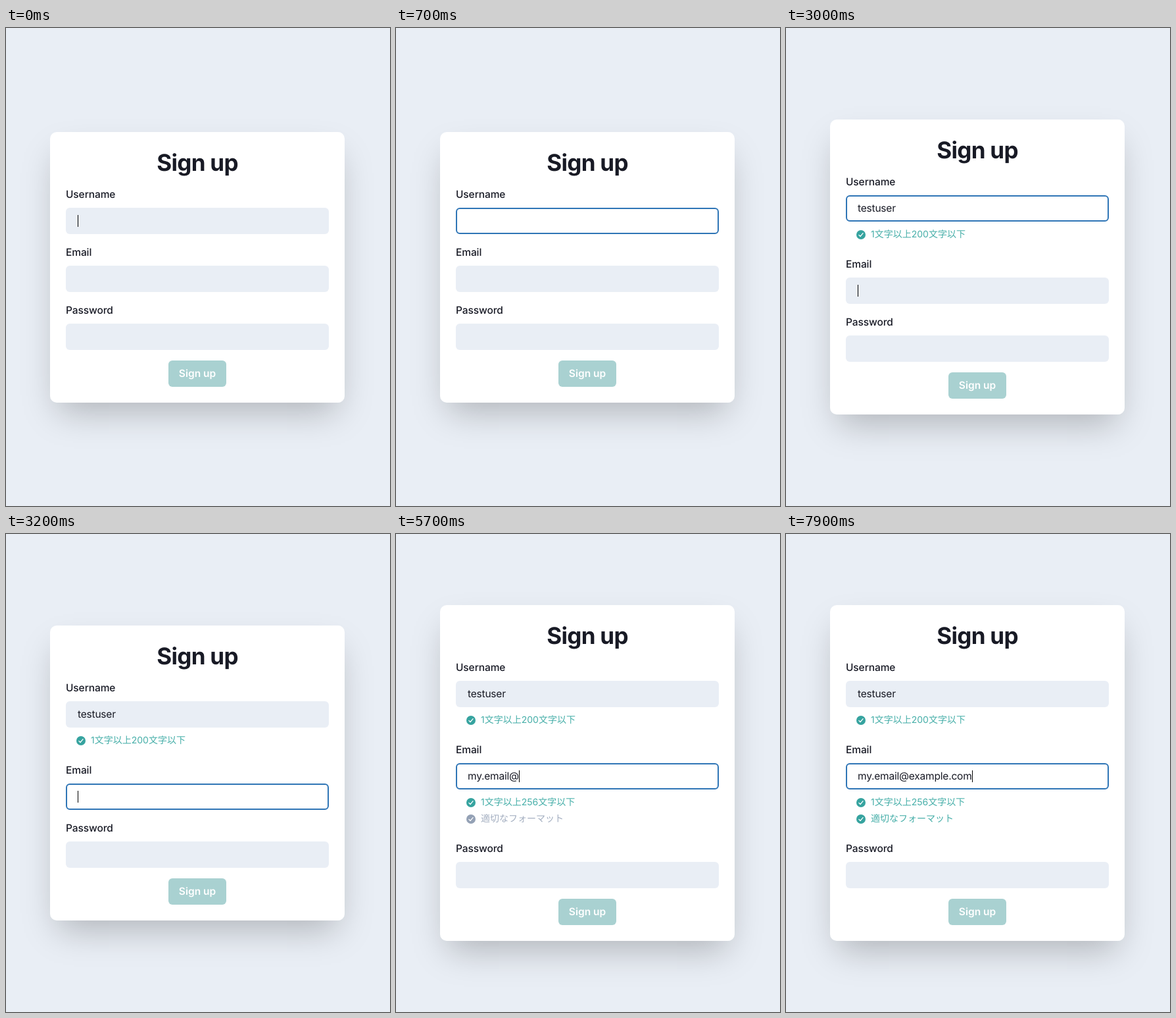
An HTML page that plays this animation: 584 by 726 pixels, repeating every 8 s.

```html
<!DOCTYPE html>
<html lang="en">
<head>
<meta charset="utf-8">
<title>Sign up</title>
<style>
  * { box-sizing: border-box; margin: 0; padding: 0; }
  html, body { width: 100%; height: 100%; overflow: hidden; }
  body {
    position: relative; background: #e9eef5; color: #181a25;
    font: 15.5px/24px Inter, "Noto Sans CJK JP", "Noto Sans CJK", sans-serif;
    text-rendering: geometricPrecision;
  }
  #card {
    position: absolute; left: 67px; width: 448px; padding: 24px;
    background: #fff; border-radius: 10px;
    box-shadow: 0 25px 50px -12px rgba(0, 0, 0, .25);
  }
  h1 {
    height: 59px; font-size: 35px; line-height: 46px; font-weight: 700;
    letter-spacing: -.7px; text-align: center;
  }
  .field { margin-bottom: 16px; }
  label { display: block; margin-bottom: 8px; font-weight: 500; letter-spacing: -.1px; }
  .input {
    position: relative; display: flex; align-items: center; height: 40px;
    padding-left: 16px; border: 2px solid transparent; border-radius: 6px;
    letter-spacing: -.2px; white-space: pre;
  }
  .caret { width: 1px; height: 18px; background: #000; }
  ul { list-style: none; padding: 7px 0 5px 16px; }
  li { display: flex; align-items: center; height: 25px; font-size: 14px; line-height: 25px; color: #a3aec0; }
  li svg { width: 14px; height: 14px; margin: 1px 8px 0 0; fill: #94a1b5; }
  li path { fill: none; stroke: #fff; stroke-width: 1.3; stroke-linecap: round; stroke-linejoin: round; }
  li.ok { color: #45aea8; }
  li.ok svg { fill: #36a39f; }
  #button {
    width: 88px; height: 40px; margin: 0 auto; border-radius: 6px;
    background: #a9d1d1; color: #fff; font-weight: 600; line-height: 40px; text-align: center;
  }
</style>
</head>
<body>
<div id="card">
  <h1>Sign up</h1>
  <div id="fields"></div>
  <div id="button">Sign up</div>
</div>
<script>
const LOOP = 8000, STEP = 100, BLINK = 500, FADE = 200, STAGE_HEIGHT = 726;
const anyText = text => text.length > 0;
const emailFormat = text => /^.+@.+\..+$/.test(text);

// keys: time at which each character of the text appears
const fields = [
  { label: 'Username', text: 'testuser', focus: 0, blur: 3000,
    keys: [800, 900, 1100, 1200, 1800, 1800, 1900, 2100],
    hints: [['1文字以上200文字以下', anyText]] },
  { label: 'Email', text: 'my.email@example.com', focus: 3000, blur: Infinity,
    keys: [3300, 3500, 4300, 4500, 4600, 4700, 4800, 4900, 5700,
           6400, 6500, 6700, 6800, 6900, 7100, 7300, 7500, 7600, 7800, 7900],
    hints: [['1文字以上256文字以下', anyText], ['適切なフォーマット', emailFormat]] },
  { label: 'Password', text: '', focus: Infinity, blur: Infinity, keys: [], hints: [] }
];

const card = document.getElementById('card');
const icon = '<svg viewBox="0 0 14 14"><circle cx="7" cy="7" r="7"/><path d="M3.9 7.4 6 9.5 10.1 4.7"/></svg>';

for (const field of fields) {
  const el = document.createElement('div');
  el.className = 'field';
  el.innerHTML = `<label>${field.label}</label>
    <div class="input"><span></span><i class="caret"></i></div>
    <ul lang="ja">${field.hints.map(([text]) => `<li>${icon}${text}</li>`).join('')}</ul>`;
  document.getElementById('fields').append(el);
  field.input = el.querySelector('.input');
  field.value = el.querySelector('span');
  field.caret = el.querySelector('.caret');
  field.list = el.querySelector('ul');
  field.items = [...el.querySelectorAll('li')];
}

function fade(elapsed) {
  const p = Math.min(Math.max(elapsed / FADE, 0), 1);
  return 1 - (1 - p) ** 2;
}

function drawField(field, t) {
  const typed = field.keys.filter(k => k <= t);
  const text = field.text.slice(0, typed.length);
  field.value.textContent = text;

  const focus = fade(t - field.focus) - fade(t - field.blur);
  field.input.style.backgroundColor = `rgba(233, 238, 245, ${1 - focus})`;
  field.input.style.borderColor = `rgba(47, 117, 182, ${focus})`;

  // The blink restarts with every key
  const active = t >= field.focus && t < field.blur;
  const idle = t - Math.max(field.focus, ...typed);
  field.caret.style.visibility = active && idle % (2 * BLINK) < BLINK ? 'visible' : 'hidden';

  field.list.style.display = text ? 'block' : 'none';
  field.items.forEach((item, i) => item.classList.toggle('ok', field.hints[i][1](text)));
}

function draw(t) {
  for (const field of fields) drawField(field, t);
  card.style.top = Math.round((STAGE_HEIGHT - card.offsetHeight) / 2) + 'px';
}

const start = performance.now();
function tick() {
  const t = (performance.now() - start) % LOOP;
  draw(Math.floor(t / STEP) * STEP);
  requestAnimationFrame(tick);
}
tick();
</script>
</body>
</html>
```
